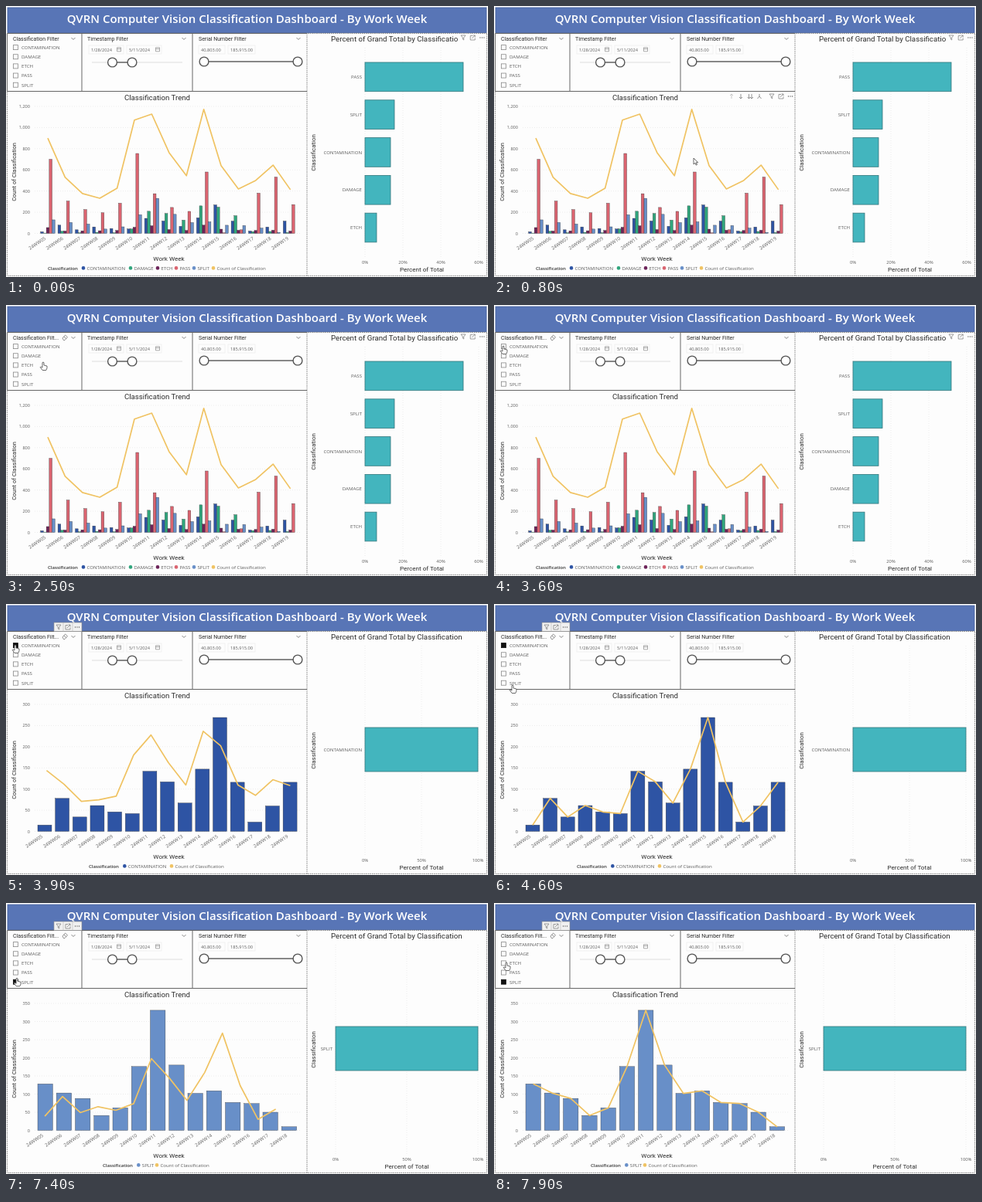
Animation, 623 px wide and 351 px high, one loop 8 s. Source, as an HTML page:

```html
<!DOCTYPE html>
<html lang="en">
<head>
<meta charset="utf-8">
<title>Classification dashboard</title>
<style>
  html, body { margin: 0; width: 100%; height: 100%; overflow: hidden; background: #fff; }
  svg { display: block; width: 623px; height: 351px; }
  text { font-family: "Open Sans", "Noto Sans", sans-serif; font-size: 6.1px; fill: #5c5c5c; }
  .din { font-family: Roboto, "Liberation Sans", sans-serif; fill: #2b2b2b; }
  .mid { text-anchor: middle; }
  .end { text-anchor: end; }
  .bold { font-weight: 600; fill: #333; }
</style>
</head>
<body>
<svg id="stage" viewBox="0 0 623 351"></svg>
<script>
const LOOP = 8000, PICK_FIRST = 3700, PICK_SECOND = 7300, MORPH = 520;
const BASE = 294.5, PLOT = 164.5;
const TEAL = '#43b5be', GOLD = '#f0c363';
const series = [
  { name: 'CONTAMINATION', color: '#2e54a4', legend: 100,
    data: [15, 78, 34, 61, 46, 42, 142, 117, 67, 147, 269, 116, 22, 60, 116] },
  { name: 'DAMAGE', color: '#30a57c', legend: 161,
    data: [3, 20, 6, 10, 6, 42, 209, 188, 125, 260, 248, 167, 16, 18, 8] },
  { name: 'ETCH', color: '#6c2359', legend: 196,
    data: [55, 22, 24, 25, 28, 58, 72, 36, 28, 78, 40, 30, 28, 30, 22] },
  { name: 'PASS', color: '#da6470', legend: 220,
    data: [700, 305, 225, 195, 285, 755, 375, 245, 208, 580, 6, 34, 380, 532, 272] },
  { name: 'SPLIT', color: '#688fc8', legend: 243,
    data: [128, 103, 88, 41, 62, 176, 331, 180, 102, 109, 77, 74, 50, 10] }
];
const totals = [900, 530, 377, 332, 427, 1070, 1127, 763, 545, 1172, 640, 420, 500, 645, 413];

// Each view describes both charts for one filter choice.
const views = {
  all: { max: 1200, step: 200, x0: 54, pitch: 22.4, line: totals, bars: series, width: 3.72,
    legend: 54, countDot: 268, left: 464, pct: [0, 20, 40, 60], pctMax: 60,
    rows: [['PASS', 591], ['SPLIT', 502], ['CONTAMINATION', 497], ['DAMAGE', 497], ['ETCH', 479]] },
  contamination: { max: 300, step: 50, x0: 50, pitch: 22.65, line: series[0].data, bars: [series[0]], width: 18,
    legend: 107, countDot: 214, left: 464, pct: [0, 50, 100], pctMax: 100, rows: [['CONTAMINATION', 610]] },
  split: { max: 350, step: 50, x0: 50.7, pitch: 24.25, line: series[4].data, bars: [series[4]], width: 19.4,
    legend: 125, countDot: 195, left: 426, pct: [0, 50, 100], pctMax: 100, rows: [['SPLIT', 610]] }
};

// Time, x, y of the pointer tip.
const route = [[300, 388, 226], [750, 258, 197], [1100, 258, 197], [1900, 112, 132], [2400, 48, 74],
  [2800, 48, 74], [3500, 12, 53], [4100, 12, 53], [4550, 24, 105], [6300, 23, 105],
  [6400, 14, 98], [7350, 14, 98], [7800, 16, 77], [8000, 16, 77]];

const stage = document.getElementById('stage');
const mix = (a, b, p) => a + (b - a) * p;
const clamp = v => Math.max(0, Math.min(1, v));
const rect = (x, y, w, h, fill, extra = '') =>
  `<rect x="${x}" y="${y}" width="${w}" height="${h}" fill="${fill}" ${extra}/>`;
const path = (d, color = '#555', width = 1, extra = '') =>
  `<path d="${d}" fill="none" stroke="${color}" stroke-width="${width}" ${extra}/>`;
const text = (x, y, value, cls = '', size = 6.1, extra = '') =>
  `<text x="${x}" y="${y}" class="${cls}" style="font-size:${size}px" ${extra}>${value}</text>`;
const dot = (x, y, r, fill, extra = '') => `<circle cx="${x}" cy="${y}" r="${r}" fill="${fill}" ${extra}/>`;
const upright = (x, y, value, size) =>
  text(0, 0, value, 'din mid', size, `transform="translate(${x} ${y}) rotate(-90)"`);

const funnel = (x, y) => path(`M${x - 3} ${y - 3}h6l-2.3 3v3l-1.4 -1v-2z`, '#777', .7);
const focus = (x, y) => path(`M${x} ${y - 2.5}h-3v5.5h6v-2.5M${x - 1} ${y + 1}l4 -4m-2.5 0h2.5v2.5`, '#777', .7);
const more = (x, y) => [-2.5, 0, 2.5].map(d => dot(x + d, y, .65, '#555')).join('');
const tools = (x, y, gap) => funnel(x, y) + focus(x + gap, y) + more(x + 2 * gap, y);
const chevron = x => path(`M${x - 2.5} 41l2.5 2.5l2.5 -2.5`, '#666', .8);
const calendar = x => path(`M${x - 2.5} 53.8h5v5h-5zM${x - 2.5} 55.6h5`, '#888', .7);

function slider(from, to, a, b, y) {
  const knob = x => dot(x, y, 5.9, '#fff', 'stroke="#555" stroke-width="1.4"');
  return path(`M${from} ${y}H${to}`, '#ddd', 1.2) + path(`M${a} ${y}H${b}`, '#666', 1.5) + knob(a) + knob(b);
}

function frame() {
  const dashed = 'stroke-dasharray="1.5 1"';
  return rect(0, 0, 623, 351, '#fdfdfd') +
    rect(2, 2, 619, 32.5, '#5875b6', 'stroke="#46629f" stroke-width=".8"') +
    text(311.5, 22, 'QVRN Computer Vision Classification Dashboard - By Work Week', 'mid', 15,
      'font-weight="600" style="fill:#fff;font-size:15px"').replace('style="font-size:15px" ', '') +
    path('M1.5 35.5H389M98 35.5V110.5M241 35.5V110.5M1.5 110.5H389M1.5 35.5V110.5', '#666', 1) +
    path('M1.5 111V349.5H621.5V35.5H389V349.5', '#858585', 1, dashed);
}

function filters(t) {
  const active = t >= 2300;
  const chosen = t >= PICK_SECOND ? 'SPLIT' : t >= PICK_FIRST ? 'CONTAMINATION' : '';
  let out = text(9, 44.5, active ? 'Classification Filt...' : 'Classification Filter', 'din', 7) + chevron(87);
  if (active) out += path('M73 43l3.5 -4l3 2.6l-3.5 4h-1.6zM74.8 41l3 2.6', '#666', .7);
  series.forEach(({ name }, i) => {
    const y = 53.6 + i * 12.15, on = name === chosen;
    out += rect(9.4, y - 3, 6, 6, on ? '#111' : '#fff', `stroke="${on ? '#111' : '#888'}" stroke-width=".8"`) +
      text(20, y + 2.3, name);
  });
  out += text(105, 44.5, 'Timestamp Filter', 'din', 7) + chevron(230) +
    text(249, 44.5, 'Serial Number Filter', 'din', 7) + chevron(378);
  [[107, 45, '1/28/2024', 110], [156, 45, '5/11/2024', 159], [249, 34, '40,803.00', 252], [287, 35, '185,915.00', 290]]
    .forEach(([x, w, value, tx]) => {
      out += rect(x, 51, w, 11, 'none', 'stroke="#ececec" stroke-width=".7"') + text(tx, 58.7, value, '', 5.7);
    });
  out += calendar(146) + calendar(196) + slider(111, 228, 137.5, 163, 73) + slider(256, 377, 256, 377, 72);
  if (t >= PICK_FIRST) {
    out += rect(62, 24, 36, 11.5, '#f1f1f1', 'stroke="#8a8a8a" stroke-width=".6"') +
      path('M74 24v11.5M86 24v11.5', '#bbb', .6) + tools(68, 30, 12);
  }
  return out;
}

const points = view => view.line.map((v, i) => [view.x0 + i * view.pitch, BASE - v / view.max * PLOT]);

function trend(view, before, p) {
  let out = text(195.5, 121.5, 'Classification Trend', 'din mid', 9.7);
  for (let v = 0; v <= view.max; v += view.step) {
    const y = BASE - v / view.max * PLOT;
    out += path(`M37 ${y}H380`, '#e6e6e6', .7, 'stroke-dasharray="1 2"') +
      text(31, y + 2, v.toLocaleString('en-US'), 'end', 5.6);
  }
  const group = view.bars.length * view.width;
  view.bars.forEach((bar, k) => bar.data.forEach((v, i) => {
    const h = v / view.max * PLOT;
    out += rect(view.x0 + i * view.pitch - group / 2 + k * view.width, BASE - h, view.width, h,
      bar.color, 'stroke="#333" stroke-width=".35"');
  }));
  const target = points(view), start = points(before);
  const line = target.map(([x, y], i) => [mix(start[i][0], x, p), mix(start[i][1], y, p)]);
  out += path('M' + line.map(q => q.map(n => n.toFixed(2)).join(' ')).join('L'), GOLD, 1.7, 'stroke-linejoin="round"');
  target.forEach(([x], i) => {
    out += text(0, 0, '24WW' + String(i + 5).padStart(2, '0'), 'end', 6.1,
      `transform="translate(${x - 2} 302) rotate(-34)"`);
  });
  out += text(210.5, 330, 'Work Week', 'din mid', 8.1) + upright(12.5, 215, 'Count of Classification', 7.5);

  out += text(view.legend, 341.6, 'Classification', 'bold');
  const lone = view.bars.length === 1;
  view.bars.forEach(bar => {
    const x = lone ? view.legend + 46.3 : bar.legend;
    out += dot(x, 339.4, 2.3, bar.color) + text(x + 4.5, 341.6, bar.name);
  });
  return out + dot(view.countDot, 339.4, 2.3, GOLD) + text(view.countDot + 4.5, 341.6, 'Count of Classification');
}

function share(view) {
  const all = view.rows.length > 1, right = all ? 611 : 610;
  let out = text(420, 45.5, 'Percent of Grand Total by Classificatio' + (all ? '' : 'n'), 'din', 9.7);
  if (all) out += tools(591, 41, 12.2);
  view.pct.forEach(v => {
    const x = mix(view.left, right, v / view.pctMax);
    out += path(`M${x} 54V325`, '#e6e6e6', .7, 'stroke-dasharray="1 2"') + text(x, 333.8, v + '%', 'mid', 5.8);
  });
  view.rows.forEach(([name, end], i) => {
    const y = all ? 73 + i * 48.8 : 160, h = all ? 37.7 : 57;
    out += rect(view.left, y, end - view.left, h, TEAL, 'stroke="#35777c" stroke-width=".8"') +
      text(view.left - 4, y + h / 2 + 2.2, name, 'end');
  });
  return out + text((view.left + right) / 2, 344.3, 'Percent of Total', 'din mid', 8.1) +
    upright(400, 190, 'Classification', 7.9);
}

function trendTools() {
  const arrow = (x, dir, color) => path(`M${x} ${117 - 3 * dir}v${6 * dir}m-2 ${-2 * dir}l2 ${2 * dir}l2 ${-2 * dir}`, color, .8);
  return arrow(307, -1, '#bbb') + arrow(319, 1, '#777') + arrow(329.5, 1, '#777') + arrow(333, 1, '#777') +
    path('M343 114v3l-2.5 3M343 117l2.5 3', '#777', .8) + tools(359, 117, 12);
}

function pointer(t) {
  if (t < route[0][0]) return '';
  const i = route.findIndex(k => k[0] > t);
  const [t0, x0, y0] = route[i - 1], [t1, x1, y1] = route[i];
  const u = (t - t0) / (t1 - t0), p = u * u * (3 - 2 * u);
  const shape = t < 2200
    ? 'M0 0v8l1.9 -1.7l1.3 2.8l1.3 -.6l-1.3 -2.7h2.5z'
    : 'M-1 .6Q0 -.6 1 .6V4l4 1v2.8l-1.2 2.7h-4.6l-3 -4q1 -1 2.8 .5z';
  return `<path d="${shape}" transform="translate(${mix(x0, x1, p)} ${mix(y0, y1, p)})" fill="#fff" stroke="#444" stroke-width=".8"/>`;
}

function draw(t) {
  const [view, before, since] = t >= PICK_SECOND ? [views.split, views.contamination, PICK_SECOND]
    : t >= PICK_FIRST ? [views.contamination, views.all, PICK_FIRST] : [views.all, views.all, 0];
  const p = clamp((t - since) / MORPH);
  stage.innerHTML = frame() + filters(t) + trend(view, before, p) + share(view) +
    (t >= 400 && t < 2100 ? trendTools() : '') + pointer(t);
}

const began = performance.now();
function tick() {
  draw((performance.now() - began) % LOOP);
  requestAnimationFrame(tick);
}
tick();
</script>
</body>
</html>
```
